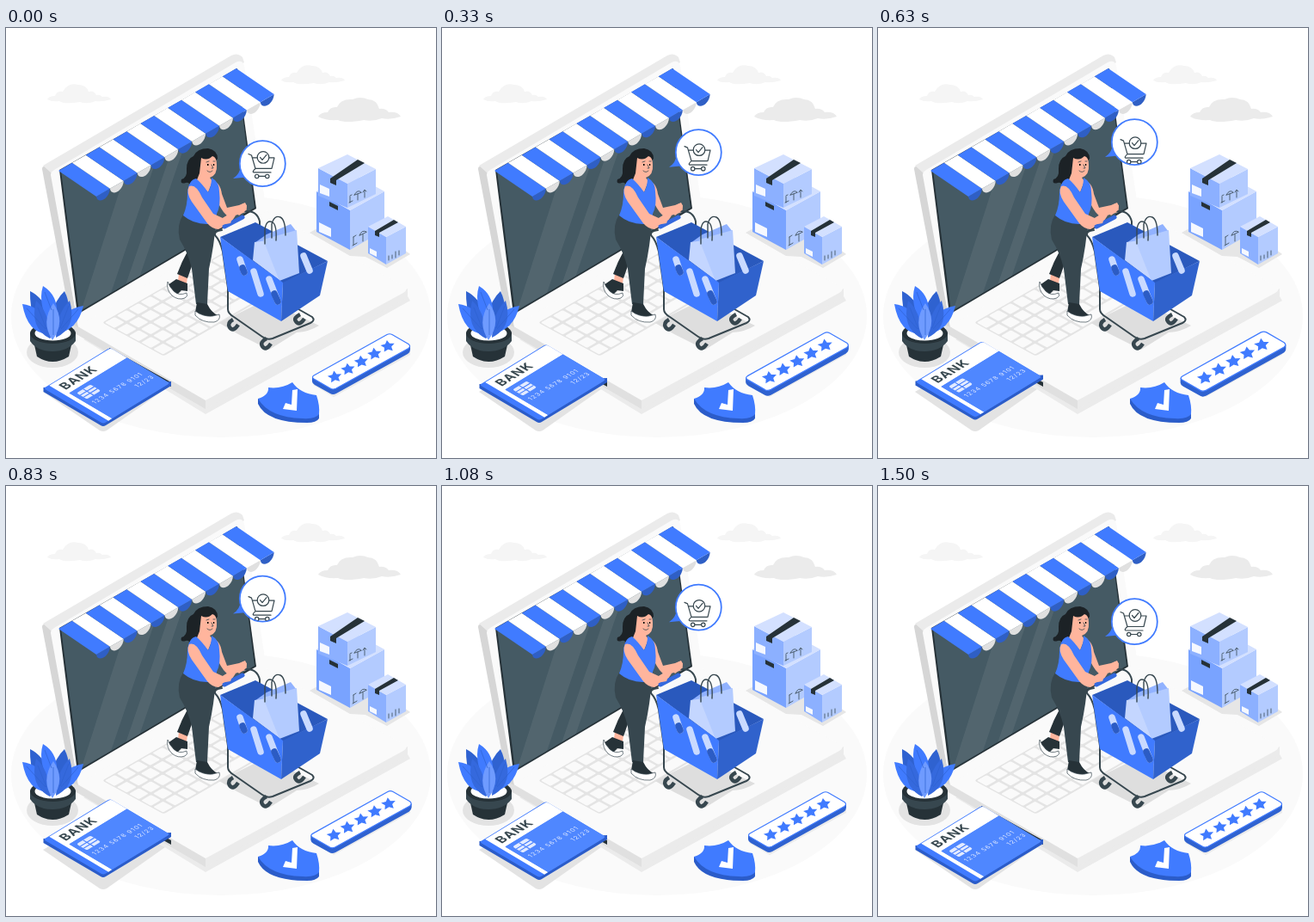
An HTML page that plays this animation: 500x500 px, repeating every 1.54 s.

```html
<!DOCTYPE html>
<html lang="en">
<head>
<meta charset="utf-8">
<title>Online shopping</title>
<style>
html, body { margin: 0; width: 100%; height: 100%; overflow: hidden; background: #fff; }
svg { display: block; width: 100vw; height: 100vh; }
text { font-family: Inter, "Open Sans", sans-serif; }
.b { fill: #407bff; } .d { fill: #37474f; } .k { fill: #263238; } .w { fill: #fff; } .s { fill: #ffb59d; }
.line { fill: none; stroke: #37474f; stroke-linecap: round; stroke-linejoin: round; }
</style>
</head>
<body>
<svg viewBox="0 0 500 500">
<defs>
  <clipPath id="screenClip"><path d="M64 166L269 47L289 209L85 330Z"/></clipPath>
  <clipPath id="bubbleClip"><circle id="clipDisc" cx="298.300" cy="157.700" r="26"/></clipPath>
</defs>
<ellipse cx="250" cy="335" rx="244" ry="141" fill="#fafafa"/>

<g id="clouds">
  <path fill="#f5f5f5" d="M48 83q2-4 9-4q2-6 9-5q6-11 18-8q9 0 12 8q6-2 9 4q4-1 7 2q8-1 10 3q-10 3-18 2q-9 4-18 1q-18 3-24-1q-9 1-14-2z"/>
  <path fill="#f5f5f5" d="M320 61q2-4 9-4q2-6 9-5q6-11 18-8q9 0 12 8q6-2 9 4q4-1 7 2q8-1 10 3q-10 3-18 2q-9 4-18 1q-18 3-24-1q-9 1-14-2z"/>
  <path fill="#ebebeb" d="M363 103q3-5 11-5q3-7 11-6q4-10 18-9q9-4 18 0q10 0 13 11q7-1 11 4q11-1 14 5q-12 4-22 2q-10 4-21 2q-21 4-30 0q-15 1-23-4z"/>
</g>

<g id="laptop">
  <path fill="#ebebeb" d="M90 362L232 449L470 317L462 304Z"/>
  <path fill="#e0e0e0" d="M77 343L232 431V443L80 355Z"/>
  <path fill="#ebebeb" d="M232 431L467 303V311Q466 314 462 316L232 443Z"/>
  <path fill="#fafafa" d="M80 345L300 211L462 300Q469 304 462 308L232 433Z"/>
  <path fill="#d6d6d6" d="M42 164Q42 160 47 161L54 168L84 348L76 344Z"/>
  <path fill="#ebebeb" d="M43 160L262 32Q269 28 275 34L277 40L53 169Z"/>
  <path fill="#fafafa" d="M52 171Q52 167 56 165L267 40Q275 36 277 44L303 213L84 347Z"/>
  <path class="k" d="M62 165L269 47L291 210L83 333Z"/>
  <path fill="#455a64" d="M64 166L268 47L289 209L85 330Z"/>
  <g clip-path="url(#screenClip)" fill="#fff" opacity=".07">
    <path d="M135 180L173 158L122 308L88 327Z"/>
    <path d="M190 150L206 141L155 290L139 299Z"/>
  </g>
  <g id="keys" transform="matrix(.866 -.5 .88 .48 112 342.500)"></g>
</g>
<g id="awning"></g>

<g id="boxes">
  <path fill="#e6e6e6" d="M353 238L400 212L470 263L443 279L418 266L400 265Z"/>
  <path fill="#79a3ff" d="M361 190L400 212V258L361 237Z"/>
  <path fill="#b3cbff" d="M400 212L440 190V235L400 258Z"/>
  <path fill="#d3e0ff" d="M361 190L400 168L440 190L400 212Z"/>
  <path fill="#8cb0ff" d="M363 163L397 181V209L363 195Z"/>
  <path fill="#b3cbff" d="M397 181L430 164V193L397 209Z"/>
  <path fill="#d3e0ff" d="M363 163L397 147L430 164L397 181Z"/>
  <path class="k" d="M377 175L409 153L417 157L384 177V183L377 180ZM376 202L386 207V212L376 207Z"/>
  <path fill="#8cb0ff" d="M421 231L442 243V275L421 262Z"/>
  <path fill="#b3cbff" d="M442 243L465 231V262L442 275Z"/>
  <path fill="#d3e0ff" d="M421 231L444 219L465 231L442 243Z"/>
  <path class="k" d="M429 236L451 223L456 226L434 238V243L429 241Z"/>
  <path fill="#f5f8ff" d="M365 182L376 187V196L365 192ZM364 226L378 233V243L364 237ZM423 256L431 260V266L423 262Z"/>
  <path class="line" stroke-width=".8" d="M400 196v7m-1 0l4-2m-3-6l2-1M405 194q4-7 8-3zm4-1v7M417 189v8m-2-6l2-3 2 2M404 243v9m-1 1l5-3m-4-7l3-2M411 241q3-7 8-4zm4-1v8M445 265v5m4-6v4m4-8v7m4-8v5"/>
</g>

<g id="plant">
  <ellipse cx="54" cy="377" rx="30" ry="18" fill="#e3e3e3"/>
  <path class="k" d="M32 364L36 382Q54 394 73 382L77 364Z"/>
  <path class="d" d="M28 354V364Q36 376 54 376T81 364V354Z"/>
  <ellipse class="k" cx="54.500" cy="355" rx="26.500" ry="12"/>
  <ellipse class="w" cx="54.500" cy="355" rx="21" ry="8.500"/>
  <path fill="#2f62d0" d="M52 357Q27 345 28 306Q43 313 52 335Q58 315 68 306Q77 324 70 343Z"/>
  <path class="b" d="M49 356Q25 355 19 321Q37 323 46 340ZM59 355Q61 328 90 323Q83 352 59 355ZM54 352Q36 322 43 300Q61 311 59 334Z"/>
  <path fill="#3569dd" d="M51 361Q27 349 35 317Q50 330 52 360ZM58 360Q59 331 74 317Q83 348 58 360Z"/>
  <path fill="#6f9bff" d="M54 363Q40 342 55 320Q70 341 54 363Z"/>
  <path fill="none" stroke="#2f62d0" stroke-width=".7" d="M24 326L46 350M84 327L64 350M45 307L53 328M55 327V357M37 325L47 350M73 323L63 349"/>
</g>

<g id="woman">
  <path class="s" d="M201 285L211 290L210 297L200 295Z"/>
  <path class="k" d="M213 240L226 256L217 274L211 291L199 286Q204 272 212 258Z"/>
  <path class="k" d="M198 292L211 297L211 306L204 305L198 311Q190 307 188 299Z"/>
  <path fill="#fff" stroke="#37474f" stroke-width=".7" d="M188 295Q186 304 193 311Q200 317 208 314Q212 312 210 308Q201 312 195 306Q190 301 188 295Z"/>
  <path class="d" d="M206 217Q198 229 202 246Q212 262 216 280L221 321H234L236 280Q242 254 244 225Z"/>
  <path class="k" d="M222 319L234 321Q239 331 246 334Q243 339 235 339Q226 336 220 331Z"/>
  <path fill="#fff" stroke="#37474f" stroke-width=".7" d="M220 329Q229 336 240 335L248 333Q250 340 242 342Q228 343 220 334Z"/>
  <path class="s" d="M240 178Q249 179 251 193L257 209L271 206L278 203Q281 207 279 214L260 220Q253 217 246 202Z"/>
  <path fill="#1c2226" d="M218 149Q222 140 235 140Q246 142 246 152L238 161L227 172Q219 181 213 184Q214 179 209 180Q202 182 204 176Q211 174 210 164Q210 152 218 149Z"/>
  <path class="s" d="M227 151Q234 155 240 149Q245 150 245 159Q246 171 237 174L240 178L235 191L221 179L225 169Z"/>
  <path class="line" stroke-width=".8" d="M233 156l3-1m5 0l2 0M239 159l2 4-2 0M234 166q3 3 6 0"/>
  <path d="M234 158h1.500v2h-1.500zM241 158h1.200v2h-1.200z"/>
  <path class="b" d="M221 175Q228 181 235 191Q239 184 239 174Q248 179 248 190Q250 207 245 216L244 227Q221 231 206 218Q211 207 211 192Q212 177 221 175Z"/>
  <path class="s" d="M213 184Q221 181 228 197L241 216L252 221L262 216L267 218L261 227L247 234Q240 234 234 227L216 202Q209 191 213 184Z"/>
</g>

<g id="cart">
  <path fill="#dedede" d="M248 343L302 316L364 346Q353 353 338 354L306 374L270 356Z"/>
  <path class="line" stroke-width="2" d="M278 213Q292 212 295 225V236M251 235Q242 236 243 241Q249 247 252 260L258 302V327Q258 332 265 336L298 359Q303 363 310 361L354 343Q360 340 356 336L326 319"/>
  <path stroke="#3569dd" stroke-width="5" stroke-linecap="round" d="M254 231L275 220"/>
  <path class="s" d="M252 221Q261 214 264 219L261 227L250 229ZM264 211L272 207 276 204 280 206 279 212 271 218Z"/>
  <path fill="none" stroke="#37474f" stroke-width="4.500" d="M264 339q-7 4-4 9q4 6 10-3M303 361q-8 4-5 9q4 6 10-3M342 333q-8 4-5 8q4 6 10-3"/>
  <path fill="#2a59bd" d="M249 243L290 226L374 271L322 297Z"/>
  <path fill="#91b2ff" d="M289 250L303 240L331 228L338 237L312 249Z"/>
  <path fill="#c4d6ff" d="M289 249L312 246L319 294L287 270Z"/>
  <path fill="#b3cbff" d="M299 246L338 235L341 285L318 294Z"/>
  <path class="line" stroke-width="1.400" d="M301 251V234Q303 222 310 226Q315 229 314 247M309 244V228Q312 217 319 220Q325 223 325 241"/>
  <path class="b" d="M249 243L322 296L320 341L258 306Z"/>
  <path fill="#3062cc" d="M322 296L374 271L365 311L320 341Z"/>
  <g stroke-linecap="round" stroke-width="7.500" stroke="#c9daff">
    <path d="M272 269L277 284M288 283L296 309M306 292L316 318M346 265L353 282"/>
    <path stroke="#2c5cc4" d="M275 279L277 284M312 309L316 318"/>
  </g>
</g>

<g id="bubble">
  <path id="tail" class="b" d="M264 175Q272 170 273 160L285 173Z"/>
  <circle id="disc" class="w" cx="298.300" cy="157.700" r="26.500" stroke="#407bff" stroke-width="1.800"/>
  <g clip-path="url(#bubbleClip)">
    <g id="icon" class="line" stroke-width="1.200">
      <path d="M282 146.500L285.500 148L290 163.500H309L312 151H306M286.500 151H292M290 163.500Q285 168 289 168H308M294 172.500H301.500"/>
      <circle cx="299" cy="150.500" r="6.800"/>
      <path d="M295.500 150.500L298 153.500L303 147.500"/>
      <circle cx="291.700" cy="172.500" r="2.200"/><circle cx="303.800" cy="172.500" r="2.200"/>
    </g>
  </g>
</g>

<path class="k" d="M120 372L192 412V417L120 377Z"/>
<path fill="#e3e3e3" d="M43 423L113 383L185 420L117 468Q113 470 109 468Z"/>
<g id="card">
  <path fill="#2b5cc9" d="M43.500 418L192 411V416L116 462Q113 464 110 462L43.500 423Z"/>
  <g transform="matrix(.85 -.52 .86 .51 43.500 419)">
    <rect class="b" width="91" height="81" rx="3"/>
    <path class="w" d="M7 1H88Q91 1 91 4V23H12V81H7Z"/>
    <path fill="#4f87ff" d="M12 23H91V78Q91 81 88 81H12Z"/>
    <text class="d" x="13" y="17" font-size="14.500" font-weight="700" letter-spacing=".8">BANK</text>
    <rect x="17" y="28" width="19" height="14" rx="2" fill="#e3ebff"/>
    <path stroke="#407bff" stroke-width="1.200" fill="none" d="M17 33H36M17 37.500H36M26 28V42"/>
    <g fill="#e3ebff" font-size="7.200" letter-spacing="1">
      <text x="17" y="53">1234 5678 9101</text>
      <text x="64" y="64">12/23</text>
    </g>
  </g>
</g>

<g id="shield">
  <path fill="#2b5cc9" d="M293 431V437Q303 459 350 459Q361 459 364 454V444Z"/>
  <path class="b" d="M293 431Q306 427 305 418Q320 420 333 412Q342 425 361 427Q365 439 364 449Q360 455 345 454Q306 453 293 431Z"/>
  <path class="w" d="M325 436L322 443L338 445L339 420L333 421L332 438Z"/>
</g>

<path fill="#ebebeb" d="M357 415L381 429L470 380V374L446 362Z"/>
<g id="rating"></g>
</svg>
<script>
const el = id => document.getElementById(id);
const range = n => [...Array(n).keys()];

el("keys").innerHTML = '<rect width="178" height="81" rx="3" fill="#e4e4e4"/>' +
  range(5).flatMap(row => range(11).map(col => {
    const space = row === 4 && col === 4;
    if (row === 4 && col > 4 && col < 8) return "";
    return `<rect x="${1.5 + col * 16}" y="${1.8 + row * 16}" width="${space ? 61 : 13.2}" height="13" rx="1.500" fill="#fafafa"/>`;
  })).join("");

const stripe = [15.9, -9.15], drop = [44, 30];
el("awning").innerHTML = range(13).map(i => {
  const x = 61 + i * stripe[0], y = 166 + i * stripe[1];
  const [dx, dy] = stripe, [ex, ey] = drop;
  const blue = i % 2 === 0;
  return `<path fill="${blue ? "#2f5fc5" : "#e0e0e0"}" d="M${x + ex} ${y + ey}c1 9 15 4 ${dx} ${dy}z"/>
    <path fill="${blue ? "#407bff" : "#fff"}" d="M${x} ${y}l${dx} ${dy}l${ex} ${ey}l${-dx} ${-dy}z"/>`;
}).join("");

const star = range(10).map(i => {
  const r = i % 2 ? 0.5 : 1, a = i * Math.PI / 5 - Math.PI / 2;
  return `${r * 8.6 * Math.cos(a)},${r * 7.2 * Math.sin(a)}`;
}).join(" ");
el("rating").innerHTML = `
  <path fill="#2f62d0" d="M356 406V411Q356 413 359 415L377 425Q380 427 384 425L467 379Q470 377 470 374V370Z"/>
  <path fill="#fff" stroke="#407bff" stroke-width="1.200" d="M358 404L443 356.500Q446 355 449 356.500L468 367.500Q471 370 468 372.500L384 419Q380 421 377 419L358 408Q355 406 358 404Z"/>` +
  range(5).map(i => `<polygon class="b" points="${star}" transform="translate(${382.3 + i * 15.4} ${405.7 - i * 8.9}) rotate(-8)"/>`).join("");

const LOOP = 1540, SWING = 1500, PULSE = 450;
const triangle = (t, period) => 1 - Math.abs(2 * t / period - 1);
const shift = (id, y) => el(id).setAttribute("transform", `translate(0 ${y})`);

function draw(now) {
  const t = now % LOOP;
  const lift = t < SWING ? triangle(t, SWING) : 0;
  for (const id of ["disc", "clipDisc", "tail"]) shift(id, -29.8 * lift);
  shift("icon", -20 * lift);
  shift("card", -9 * lift);
  const scale = 1 + (t < 2 * PULSE ? 0.095 * triangle(t % PULSE, PULSE) : 0);
  el("rating").setAttribute("transform", `translate(413 391) scale(${scale}) translate(-413 -391)`);
}

const start = performance.now();
function tick() {
  draw(performance.now() - start);
  requestAnimationFrame(tick);
}
tick();
</script>
</body>
</html>
```
